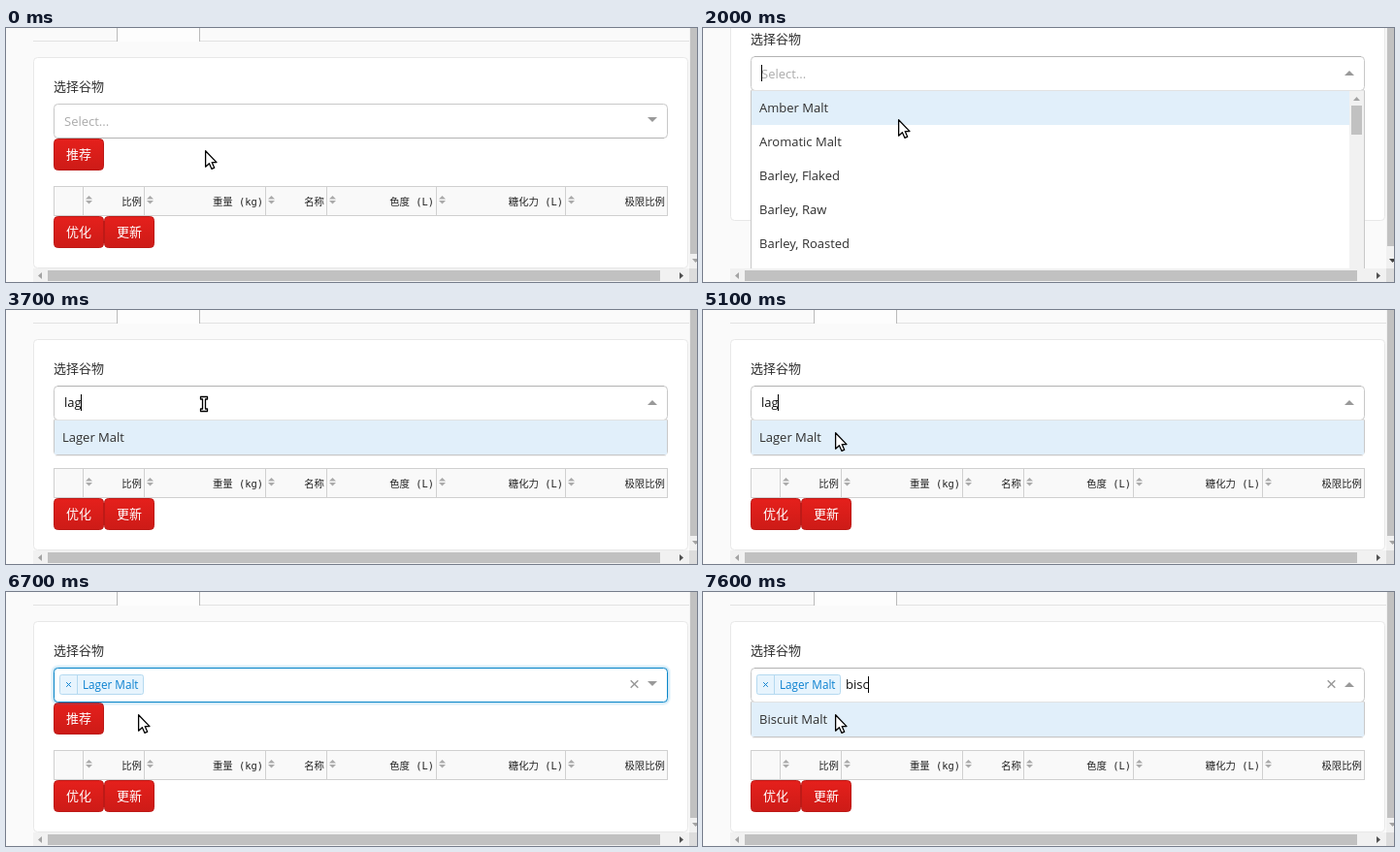
An HTML page for the animation above (8000 ms loop, 712 by 262 pixels).

```html
<!DOCTYPE html>
<html lang="zh-CN">
<head>
<meta charset="utf-8">
<title>选择谷物</title>
<style>
  html, body { margin: 0; width: 100%; height: 100%; overflow: hidden; background: #fafafa; }
  svg { display: block; width: 712px; height: 262px; }
  text { font: 13px "Open Sans", "Noto Sans CJK SC", "Noto Sans CJK", sans-serif; fill: #2f2f2f; white-space: pre; }
  .head { font: 10.4px "DejaVu Sans Mono", "Noto Sans CJK SC", "Noto Sans CJK", monospace; fill: #222; text-anchor: end; }
  .hint { fill: #aaa; }
  .tag { font-size: 11.7px; fill: #0a80d0; }
  .light { fill: #fff; }
</style>
</head>
<body>
<svg id="stage" viewBox="0 0 712 262">
  <defs>
    <clipPath id="view"><path d="M0 0H704V248H0Z"/></clipPath>
    <linearGradient id="red" x1="0" y1="0" x2="0" y2="1">
      <stop offset="0" stop-color="#e5201c"/><stop offset="1" stop-color="#cd1b17"/>
    </linearGradient>
  </defs>
  <g id="scene"></g>
</svg>
<script>
const LOOP = 8000, SHIFT = 49;
const BARLEY = ['Barley, Flaked', 'Barley, Raw', 'Barley, Roasted'];
const ALL = ['Amber Malt', 'Aromatic Malt', ...BARLEY];
const LA = ['Barley, Flaked', 'Black (Patent) Malt', 'Black Barley (Ostrel)',
  'Black Barley (Stout)', 'Blauveldin Malt (Ostrel)'];
const B = ['Amber Malt', ...BARLEY, 'Barley, Torrefied'];

// Each step changes only the listed parts of the state.
const START = { x: 205, y: 126, beam: 0, hover: 0, text: '', caret: 0, list: null, thumb: 30, tag: 0, glow: 0 };
const STEPS = [
  [0, {}],
  [100, { y: 121 }],
  [200, { y: 114 }],
  [300, { x: 204, y: 108, hover: 1 }],
  [400, { y: 104 }],
  [600, { x: 201, y: 94 }],
  [800, { list: ALL, caret: 1 }],
  [1400, { caret: 0 }],
  [2000, { caret: 1 }],
  [2600, { caret: 0 }],
  [3100, { text: 'l', caret: 1, thumb: 31 }],
  [3200, { text: 'la', list: LA, thumb: 36 }],
  [3700, { text: 'lag', list: ['Lager Malt'], beam: 1, x: 204, y: 97 }],
  [4300, { caret: 0 }],
  [4800, { caret: 1, x: 198, y: 100 }],
  [4900, { beam: 0, x: 170, y: 114 }],
  [5000, { x: 144, y: 123 }],
  [5100, { x: 136, y: 126 }],
  [5400, { caret: 0 }],
  [5500, { text: '', list: null, tag: 1, hover: 0, glow: .5 }],
  [5600, { glow: 1 }],
  [6100, { caret: 1 }],
  [6700, { caret: 0 }],
  [7000, { text: 'b', list: B, caret: 1, glow: 0, thumb: 36 }],
  [7100, { text: 'bi', list: ['Biscuit Malt'] }],
  [7300, { text: 'bis' }],
  [7600, { text: 'bisc' }]
];

const ruler = document.createElement('canvas').getContext('2d');
const textWidth = s => {
  ruler.font = '13px "Open Sans", sans-serif';
  return ruler.measureText(s).width;
};

const rect = (x, y, w, h, fill) => `<rect x="${x}" y="${y}" width="${w}" height="${h}" fill="${fill}"/>`;
const box = (x, y, w, h, fill, line, r = 0) =>
  `<rect x="${x + .5}" y="${y + .5}" width="${w - 1}" height="${h - 1}" rx="${r}" fill="${fill}" stroke="${line}"/>`;
const path = (d, fill, more = '') => `<path d="${d}" fill="${fill}" ${more}/>`;
const label = (s, x, y, cls = '') => `<text x="${x}" y="${y}" class="${cls}">${s}</text>`;
// Vertical triangle: base 2w wide at y, tip h away (negative points up).
const tri = (x, y, w, h, fill) => path(`M${x - w} ${y}h${2 * w}l${-w} ${h}z`, fill);
const side = (x, y, h, fill) => path(`M${x} ${y - 3.5}v7l${h} -3.5z`, fill);
const cross = (x, y, r, color, w) =>
  path(`M${x - r} ${y - r}l${2 * r} ${2 * r}M${x + r} ${y - r}l${-2 * r} ${2 * r}`, 'none',
    `stroke="${color}" stroke-width="${w}"`);
const button = (s, x, y) => box(x, y, 52, 33, 'url(#red)', '#bd1a17', 4) + label(s, x + 13, y + 21, 'light');

function table() {
  const edges = [49, 79, 142, 267, 330, 443, 576, 681];
  const heads = ['', '比例', '重量 (kg)', '名称', '色度 (L)', '糖化力 (L)', '极限比例'];
  return heads.map((s, i) => {
    const x = edges[i], end = edges[i + 1];
    let out = box(x, 163, end - x + 1, 31, '#f9f9f9', '#d0d0d0');
    if (s) {
      out += tri(x + 6.5, 176.6, 3.5, -3.6, '#aaa') + tri(x + 6.5, 178, 3.5, 3.6, '#aaa')
        + label(s, end - 2, 183, 'head');
    }
    return out;
  }).join('');
}

const BASE =
  rect(28, 13, 86, 1, '#e2e2e2') + rect(200, 13, 504, 1, '#e2e2e2')
  + rect(115, 0, 84, 14, '#fdfdfd') + rect(114, 0, 1, 14, '#bbb') + rect(199, 0, 1, 14, '#bbb')
  + box(28, 30, 675, 218, '#fff', '#e8e8e8', 4)
  + label('选择谷物', 49, 65)
  + button('推荐', 49, 114) + table() + button('优化', 49, 194) + button('更新', 101, 194);

function control(s) {
  const open = s.list, lit = s.glow > 0;
  let out = '';
  if (s.hover && !open) out += rect(52, 114, 627, 1, 'rgba(0,0,0,.06)');
  if (lit) {
    for (const [w, a] of [[7, .07], [4, .14]]) {
      out += `<rect x="49.5" y="78.5" width="632" height="35" rx="4" fill="none" stroke="#08c" stroke-width="${w}" opacity="${a * s.glow}"/>`;
    }
  }
  out += box(49, 78, 633, 36, '#fff', lit ? '#0a86c8' : '#c8c8c8', 4);
  if (!lit) out += rect(53, open ? 78 : 113, 625, 1, '#b3b3b3');

  const left = s.tag ? 147 : 60;
  if (s.tag) {
    out += box(55, 85, 87, 21, '#e7f4fd', '#b4d9f0', 2) + rect(73, 86, 1, 19, '#b4d9f0')
      + cross(64.5, 95.5, 2.3, '#0a80d0', 1) + label('Lager Malt', 79, 100, 'tag')
      + cross(647.5, 95, 3.8, '#999', 1.5);
  }
  if (s.text) out += `<text x="${left}" y="100" style="fill:#111">${s.text}</text>`;
  else if (!s.tag) out += label('Select...', left, 101, 'hint');
  if (s.caret) out += rect(Math.floor(left + textWidth(s.text)), 87, 1, 17, '#000');
  return out + (open ? tri(666, 98, 5, -5, '#999') : tri(666, 92, 5, 5, '#999'));
}

function menu(s) {
  if (!s.list) return '';
  const long = s.list.length > 1, h = long ? 200 : 35;
  let out = path(`M49.5 113.5V${h + 111}q0 3.5 3.5 3.5H678q3.5 0 3.5 -3.5V113.5z`, '#fff', 'stroke="#c8c8c8"')
    + rect(50, 113, 631, 1, '#e2e2e2');
  if (!long) out += rect(51, 150, 629, 1, 'rgba(0,0,0,.06)');
  out += rect(50, 114, long ? 616 : 631, 35, '#e1effa');
  out += s.list.map((name, i) => label(name, 58, 136 + 35 * i)).join('');
  if (long) {
    out += rect(666, 114, 15, h, '#f1f1f1') + tri(673.5, 124, 3.5, -4, '#a3a3a3')
      + rect(668, 129, 11, s.thumb, '#c1c1c1');
  }
  return out;
}

function bars(scrolled) {
  return rect(704, 0, 8, 248, '#f1f1f1') + rect(705, 0, 7, scrolled ? 225 : 233, '#c1c1c1')
    + tri(710.5, 238, 3.5, 4, scrolled ? '#404040' : '#a3a3a3')
    + rect(28, 248, 676, 14, '#f1f1f1') + rect(43, 250, 631, 11, '#c1c1c1')
    + side(37, 255.5, -4, '#a3a3a3') + side(694, 255.5, 4, '#505050')
    + rect(704, 248, 8, 14, '#dcdcdc');
}

function pointer(s) {
  const ink = 'stroke="#000" stroke-linejoin="round" stroke-width="1.3"';
  const d = s.beam
    ? 'M-3.5 -7.5h7v2.5h-2v10h2v2.5h-7v-2.5h2v-10h-2z'
    : 'M.6 .8V17.2L4.4 13.7L7 19.4L9.7 18.2L7.2 12.6H12Z';
  return `<g transform="translate(${s.x} ${s.y})">${path(d, '#fff', ink)}</g>`;
}

function draw(s) {
  const scrolled = s.list && s.list.length > 1;
  return rect(0, 0, 712, 262, '#fafafa')
    + `<g clip-path="url(#view)"><g transform="translate(0 ${scrolled ? -SHIFT : 0})">${BASE + control(s) + menu(s)}</g></g>`
    + bars(scrolled) + pointer(s);
}

const scene = document.getElementById('scene');
const t0 = performance.now();
let shown = -1;

function tick() {
  const t = (performance.now() - t0) % LOOP;
  const count = STEPS.filter(step => step[0] <= t).length;
  if (count !== shown) {
    shown = count;
    scene.innerHTML = draw(Object.assign({}, START, ...STEPS.slice(0, count).map(step => step[1])));
  }
  requestAnimationFrame(tick);
}
tick();
</script>
</body>
</html>
```
